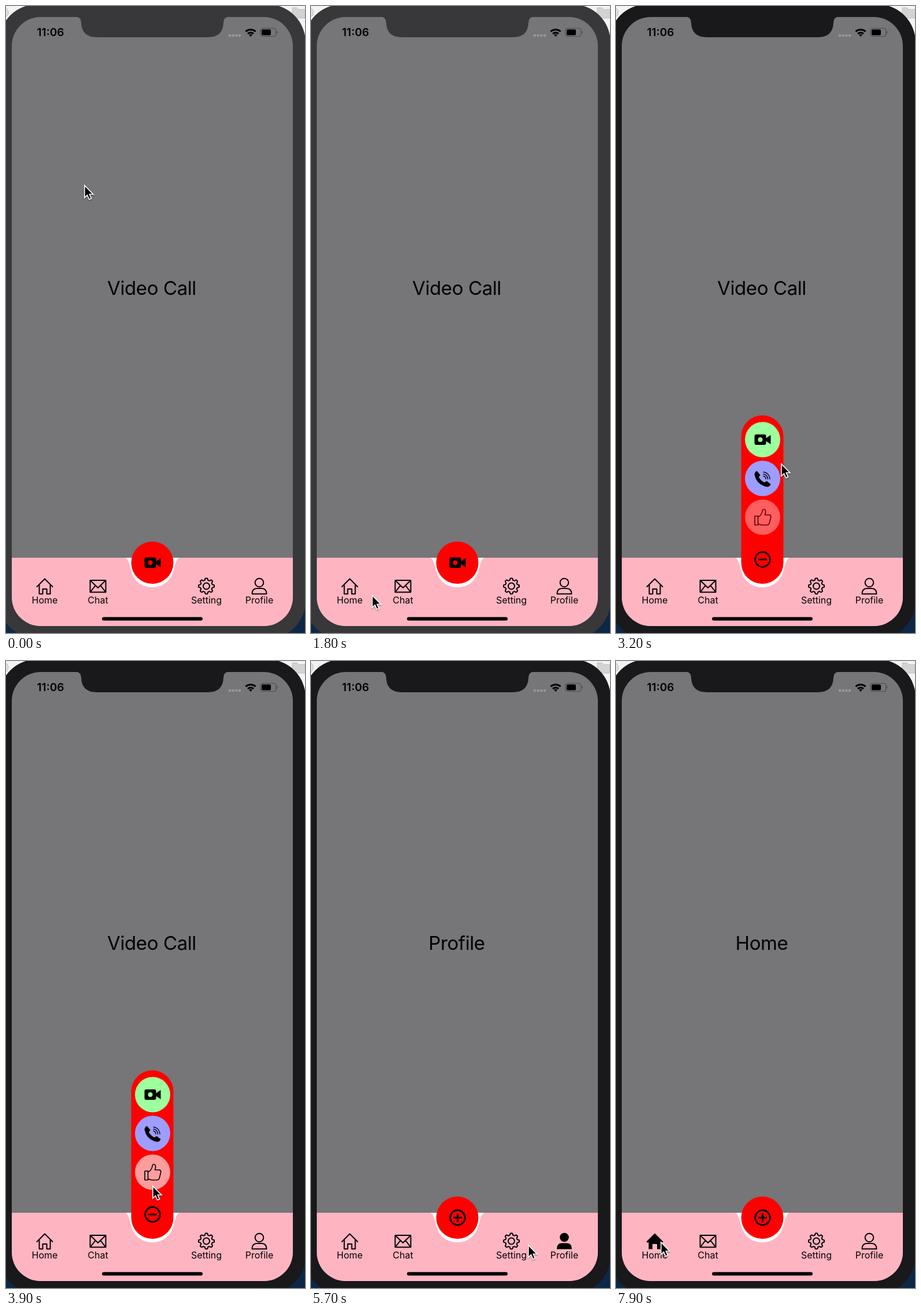
These frames come from a looping animation (517 px wide and 1083 px high, 8 s). An HTML page:

```html
<!DOCTYPE html>
<html lang="en">
<head>
<meta charset="utf-8">
<title>Tab bar menu</title>
<style>
html, body { margin: 0; width: 100%; height: 100%; overflow: hidden; background: #f4f3f4; }
svg { display: block; width: 100vw; height: 100vh; font-family: Inter, Roboto, sans-serif; }
text { text-anchor: middle; }
.line { fill: none; stroke: #000; stroke-width: 2; stroke-linejoin: round; stroke-linecap: round; }
.tab .solid, .tab.on .line { display: none; }
.tab.on .solid { display: inline; }
.tab text { font-size: 16px; }
</style>
</head>
<body>
<svg viewBox="0 0 517 1083">
  <defs>
    <clipPath id="screen"><rect x="10" y="19" width="486" height="1052" rx="50"/></clipPath>
    <filter id="shadow" x="-50%" y="-50%" width="200%" height="200%">
      <feDropShadow dx="0" dy="1.5" stdDeviation="1.2" flood-opacity=".4"/>
    </filter>
  </defs>

  <!-- desktop -->
  <rect width="517" height="1083" fill="#f4f3f4"/>
  <circle cx="-5" cy="11" r="9" fill="#e3e2e3" stroke="#bbb"/>
  <path d="M495 3h8l3 3h11v15h-22z" fill="#d3d2d4" stroke="#bebdc0"/>
  <rect y="1000" width="517" height="83" fill="#0d2846"/>

  <!-- phone -->
  <rect id="bezel" x="-12" y="-3" width="530" height="1096" rx="66"/>
  <g clip-path="url(#screen)">
    <rect x="10" y="19" width="486" height="1052" fill="#767577"/>
    <rect x="10" y="953" width="486" height="118" fill="#ffb5c1"/>
    <path d="M206 953C215 956 213 975 222 988C230 1000 242 1004 253 1004S276 1000 284 988C293 975 291 956 300 953Z" fill="#fff"/>
  </g>
  <path id="notch" d="M120 18.5Q130 18.5 130 29Q131 54 157 54H349Q375 54 376 29Q376 18.5 386 18.5Z"/>

  <!-- status bar -->
  <text x="77" y="52" font-size="19" font-weight="600">11:06</text>
  <g fill="#99989b">
    <circle cx="387" cy="51" r="2.3"/><circle cx="392.7" cy="51" r="2.3"/>
    <circle cx="398.4" cy="51" r="2.3"/><circle cx="404" cy="51" r="2.3"/>
  </g>
  <g fill="none" stroke="#000" stroke-width="3">
    <path d="M414.5 44.2A12.5 12.5 0 0 1 431.5 44.2M418 48A7.5 7.5 0 0 1 428 48"/>
    <path d="M423 53L420 49.8Q423 47.6 426 49.8Z" fill="#000" stroke="none"/>
  </g>
  <rect x="440" y="38.5" width="27" height="14" rx="4" fill="none" stroke="#4b4a4c" stroke-width="1.2"/>
  <rect x="442" y="40.5" width="16" height="10" rx="2" />
  <path d="M468.5 43Q471 45.5 468.5 48Z" fill="#4b4a4c"/>

  <text id="title" x="252" y="499" font-size="33" letter-spacing="-.4"></text>

  <!-- tabs -->
  <g class="tab" id="Home" transform="translate(67 1002)">
    <path class="line" d="M-13.5 1L0 -12.5L13.5 1M-9.5 -2V13.5H-3.5V5H3.5V13.5H9.5V-2"/>
    <path class="solid" d="M-14.5 1L0 -13.5L14.5 1L12.5 3L10.5 1.5V14H4V5H-4V14H-10.5V1.5L-12.5 3Z"/>
    <text y="30">Home</text>
  </g>
  <g class="tab" transform="translate(159 1002)">
    <path class="line" stroke-width="1.8" d="M-13.5 -10H13.5V10.5H-13.5ZM-13 -9.5L0 3L13 -9.5M-13 10L-4.5 -1M13 10L4.5 -1"/>
    <text y="30">Chat</text>
  </g>
  <g class="tab" id="Setting" transform="translate(346.5 1002)">
    <path class="line gear"/><circle class="line" r="5.5"/>
    <path class="solid gear"/><circle class="solid" r="5" fill="#ffb5c1"/>
    <text y="30">Setting</text>
  </g>
  <g class="tab" id="Profile" transform="translate(438 1002)">
    <g class="line"><circle cy="-6" r="7.3"/><path d="M-12.5 13.5Q-12.5 4 -4 4H4Q12.5 4 12.5 13.5Z"/></g>
    <g class="solid"><circle cy="-6.5" r="7.8"/><path d="M-13 14Q-13 3.5 -5 3.5H5Q13 3.5 13 14Z"/></g>
    <text y="30">Profile</text>
  </g>
  <rect x="166" y="1055.5" width="174" height="6" rx="3"/>

  <!-- centre menu -->
  <rect id="pill" x="216.5" width="73" rx="36.5" fill="red"/>
  <g id="thumb" transform="translate(253.5 883)">
    <circle r="30.5" fill="#ff9d9d"/>
    <path class="line" style="stroke-width:1.6" d="M-13.5 -2H-8V13.5H-13.5ZM-8 0C-4 -2 -1 -6 0 -12.5C3 -16 7 -12 4 -4H12Q15 -3 14 1L11.5 11Q10.5 13.5 7 13.5H-2L-8 11.5"/>
  </g>
  <g id="phone" transform="translate(253.5 816)">
    <circle r="30.5" fill="#9d9dff"/>
    <path d="M-10 -13L-4 -6L-6.5 -2Q-3 4 3 7L7 4.5L14 10Q12 15 7 14.5Q-10 11 -14 -6Q-14 -11 -10 -13Z"/>
    <path class="line" style="stroke-width:1.4" d="M1.5 -4A5 5 0 0 1 5.5 1M1.5 -7.5A8.5 8.5 0 0 1 9 1M1.5 -11A12 12 0 0 1 12.5 1"/>
  </g>
  <g id="minus" transform="translate(253.5 956)" fill="none" stroke="#000" stroke-width="2.8">
    <circle r="12.8"/><path d="M-7.5 0H7.5"/>
  </g>
  <g id="plus" transform="translate(253.5 961.5)" fill="none" stroke="#000" stroke-width="2.8">
    <circle r="12.8"/><path d="M-7.5 0H7.5M0 -7.5V7.5"/>
  </g>
  <g id="video">
    <circle id="disc" r="30.5"/>
    <path fill-rule="evenodd" d="M-11 -9H3Q6 -9 6 -6V-2.5L14 -8V8L6 2.5V6Q6 9 3 9H-11Q-14 9 -14 6V-6Q-14 -9 -11 -9ZM-8 0A4 4 0 0 0 0 0A4 4 0 0 0 -8 0Z"/>
  </g>

  <path id="cursor" filter="url(#shadow)" d="M.8 1V22L5.5 17.7L8.8 25L12.5 23.4L9.3 16.3H15.8Z" stroke="#fff" stroke-width="1.6"/>
</svg>
<script>
const LOOP = 8000, STEP = 100;
const $ = id => document.getElementById(id);
const set = (id, attrs) => { for (const k in attrs) $(id).setAttribute(k, attrs[k]); };
const ramp = (t, a, b) => Math.min(1, Math.max(0, (t - a) / (b - a)));
const ease = x => x < .5 ? 2 * x * x : 1 - 2 * (1 - x) * (1 - x);
const mix = (a, b, p) => a + (b - a) * p;

// time, x, y of the pointer tip
const route = [
  [0, 135, 309], [200, 137, 330], [900, 240, 935], [1200, 430, 1012],
  [1550, 38, 1035], [1800, 105, 1017], [2250, 252, 966], [2700, 260, 973],
  [3200, 285, 790], [3600, 253, 793], [3700, 253, 864], [3800, 253, 864],
  [4000, 253, 948], [4150, 255, 950], [4400, 313, 973], [4700, 350, 1002],
  [5200, 436, 1003], [5400, 436, 1003], [5700, 375, 1008], [5900, 346, 1004],
  [6500, 350, 1003], [7300, 66, 1004], [7600, 66, 1002], [7900, 77, 1003]
];
const pages = [[0, 'Video Call'], [5300, 'Profile'], [6000, 'Setting'], [7600, 'Home']];

function pointer(t) {
  const i = Math.max(1, route.findIndex(k => k[0] >= t));
  const [a, b] = [route[i - 1], route[i]];
  const p = ease(ramp(t, a[0], b[0]));
  return [mix(a[1], b[1], p), mix(a[2], b[2], p)];
}

function gearPath() {
  const points = [];
  for (let i = 0; i < 128; i++) {
    const a = i * Math.PI / 64;
    const r = 12 + 1.6 * Math.tanh(2.5 * Math.cos(8 * a));
    points.push((r * Math.sin(a)).toFixed(2) + ' ' + (-r * Math.cos(a)).toFixed(2));
  }
  return 'M' + points.join('L') + 'Z';
}

function draw(t) {
  const open = ease(ramp(t, 2560, 2875)) * (1 - ease(ramp(t, 4060, 4360)));
  const fade = (a, b) => ramp(t, a, b) * (1 - ramp(t, 4060, 4220));
  const page = pages.filter(p => p[0] <= t).pop()[1];
  const onCall = page === 'Video Call';

  $('title').textContent = page;
  for (const id of ['Home', 'Setting', 'Profile']) $(id).classList.toggle('on', id === page);

  const shade = t < 2300 ? '#38373a' : '#19181b';
  set('bezel', { fill: shade });
  set('notch', { fill: shade });

  const top = 925 - 218 * open;
  set('pill', { y: top, height: 998 - top });
  set('video', {
    transform: `translate(253.5 ${961.5 - 212.5 * open}) rotate(${360 * open})`,
    opacity: onCall ? 1 : 0
  });
  set('disc', {
    fill: `rgb(${mix(255, 157, open)}, ${mix(157, 255, open)}, 157)`,
    'fill-opacity': open
  });
  set('phone', { opacity: fade(2850, 3100) });
  set('thumb', { opacity: fade(3020, 3320) });
  set('minus', { opacity: fade(2900, 3220) });
  set('plus', { opacity: onCall ? 0 : 1 });
  set('cursor', { transform: `translate(${pointer(t)})` });
}

function tick() {
  const t = (performance.now() - start) % LOOP;
  draw(Math.floor(t / STEP) * STEP);
  requestAnimationFrame(tick);
}

document.querySelectorAll('.gear').forEach(g => g.setAttribute('d', gearPath()));
const start = performance.now();
tick();
</script>
</body>
</html>
```
